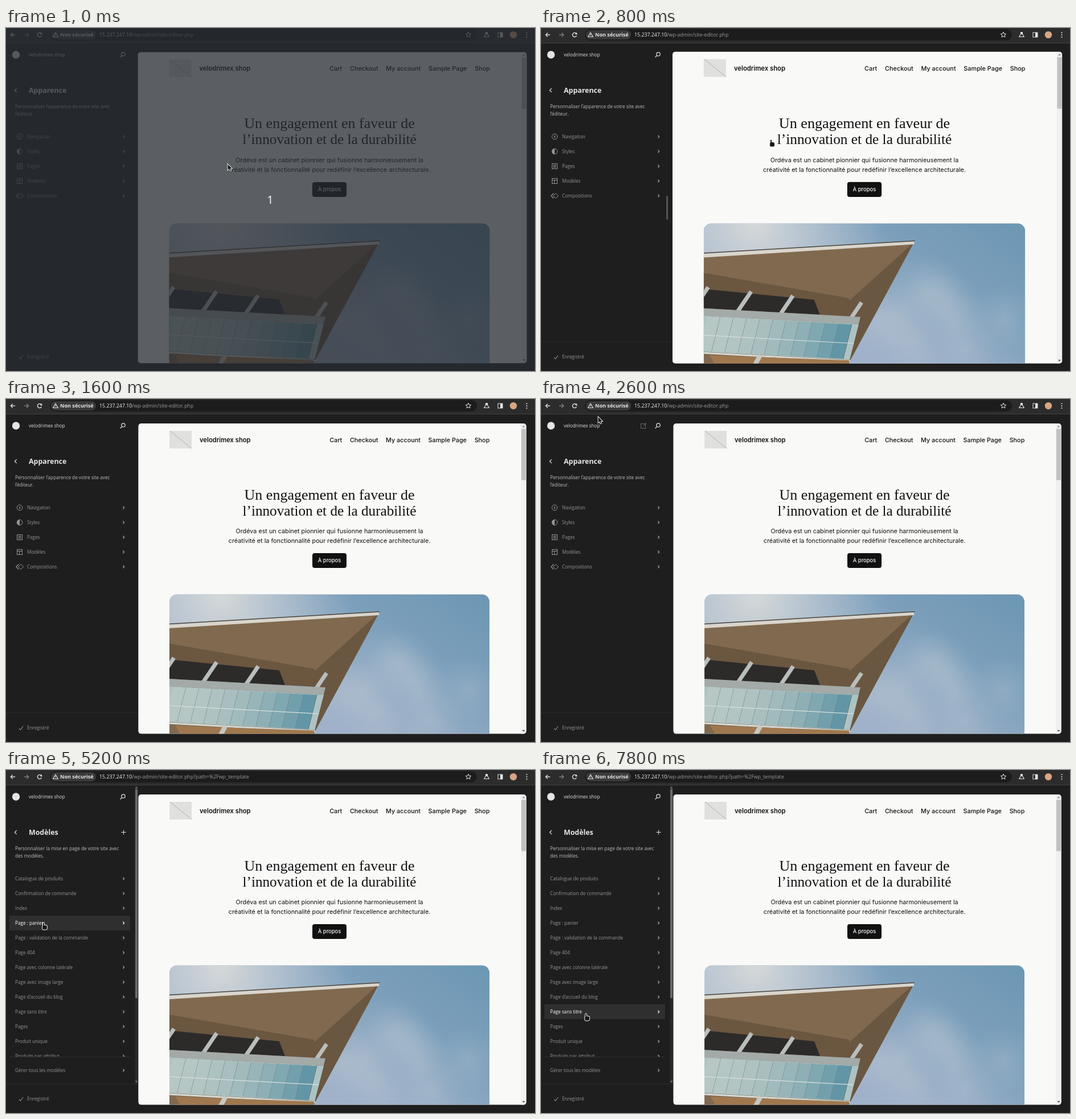
These frames come from a looping animation (929x603 px, 8 s). An HTML page with a canvas:

```html
<!DOCTYPE html>
<html lang="fr">
<head>
<meta charset="utf-8">
<title>Éditeur de site</title>
<style>
html, body { margin: 0; width: 100%; height: 100%; overflow: hidden; background: #1e1e1e; }
canvas { display: block; width: 929px; height: 603px; }
</style>
</head>
<body>
<canvas id="stage" width="929" height="603"></canvas>
<script>
const W = 929, H = 603, LOOP = 8000, TICK = 200, LIST_OPENS = 5000;
const ctx = document.getElementById('stage').getContext('2d');
const UI = '"Open Sans", "Noto Sans", sans-serif';
const SITE = 'Inter, sans-serif';
const SERIF = '"Liberation Serif", serif';
const SHOP = 'velodrimex shop';
const GREY = '#949494', LIGHT = '#e6e6e6', INK = '#111', PAPER = '#f9f9f7';

const menu = ['Navigation', 'Styles', 'Pages', 'Modèles', 'Compositions'];
const templates = ['Catalogue de produits', 'Confirmation de commande', 'Index', 'Page : panier',
  'Page : validation de la commande', 'Page 404', 'Page avec colonne latérale', 'Page avec image large',
  'Page d’accueil du blog', 'Page sans titre', 'Pages', 'Produit unique', 'Produits par attribut'];

// pointer waypoints: time, x, y
const route = [
  [0, 389, 239], [200, 389, 238], [800, 404, 196], [1200, -4, 277], [2000, -60, 200],
  [2400, 70, 6], [2600, 100, 31], [3200, 24, 314], [3600, 2, 290], [4000, 66, 268], [5800, 66, 268],
  [6200, 40, 290], [6600, 12, 98], [7000, 7, 215], [7200, 50, 567], [7600, 50, 567], [7800, 79, 428]
];

const mix = (a, b, k) => a + (b - a) * k;
const progress = (t, from, to) => Math.min(1, Math.max(0, (t - from) / (to - from)));
const ease = k => k * k * (3 - 2 * k);
const rowY = i => 191 + 26 * i;

function pointerAt(t) {
  const next = route.findIndex(key => key[0] > t);
  const [t1, x1, y1] = route[next < 0 ? route.length - 1 : next - 1];
  if (next < 0) return [x1, y1];
  const [t2, x2, y2] = route[next];
  const k = progress(t, t1, t2);
  return [mix(x1, x2, k), mix(y1, y2, k)];
}

// the preview swells while the pointer is over it
function pageScale(t) {
  const swell = ease(progress(t, 200, 800)) - ease(progress(t, 800, 1600)) + (1 - progress(t, 0, 200)) / 2;
  return 1 + 0.0045 * swell;
}

function seeded(seed) {
  return () => (seed = (seed * 16807) % 2147483647) / 2147483647;
}

function text(str, x, y, size, color, font = UI, weight = 400, align = 'left') {
  ctx.font = `${weight} ${size}px ${font}`;
  ctx.textAlign = align;
  ctx.fillStyle = color;
  ctx.fillText(str, x, y);
  return ctx.measureText(str).width;
}
function rect(x, y, w, h, color, radius = 0) {
  ctx.beginPath();
  ctx.roundRect(x, y, w, h, radius);
  ctx.fillStyle = color;
  ctx.fill();
}
function trace(points, closed) {
  ctx.beginPath();
  for (const [x, y] of points) ctx.lineTo(x, y);
  if (closed) ctx.closePath();
}
function fill(points, color) {
  trace(points, true);
  ctx.fillStyle = color;
  ctx.fill();
}
function stroke(points, color, width = 1, closed = false) {
  trace(points, closed);
  ctx.strokeStyle = color;
  ctx.lineWidth = width;
  ctx.stroke();
}
function line(x1, y1, x2, y2, color, width) {
  stroke([[x1, y1], [x2, y2]], color, width);
}
function disc(x, y, r, color, from = 0, to = 7) {
  ctx.beginPath();
  ctx.arc(x, y, r, from, to);
  ctx.fillStyle = color;
  ctx.fill();
}
function ring(x, y, r, color, width = 1, from = 0, to = 7) {
  ctx.beginPath();
  ctx.arc(x, y, r, from, to);
  ctx.strokeStyle = color;
  ctx.lineWidth = width;
  ctx.stroke();
}
function box(x, y, size, color) {
  ctx.strokeStyle = color;
  ctx.lineWidth = 1;
  ctx.strokeRect(x, y, size, size);
}
// points around a centre, first one straight up; inner alternates the radius
function around(x, y, r, n, inner = r) {
  return Array.from({ length: n }, (_, i) => {
    const a = i * 2 * Math.PI / n, d = i % 2 ? inner : r;
    return [x + d * Math.sin(a), y - d * Math.cos(a)];
  });
}
function chevron(x, y, color, dir = 1, size = 2.3) {
  const back = x - dir * size / 2;
  stroke([[back, y - size], [x + dir * size / 2, y], [back, y + size]], color, 1.2);
}
function scrollArrow(x, y, dir, color) {
  fill([[x - 2.5, y - dir * 1.5], [x + 2.5, y - dir * 1.5], [x, y + dir * 1.5]], color);
}

function drawToolbar(listOpen) {
  const y = 12;
  rect(0, 0, W, 26, '#2c2c2c');
  rect(0, 26, W, 1, '#414141');
  rect(77, 2, 750, 20, '#1c1c1c', 10);
  rect(79, 4, 79, 16, '#3a3a3a', 8);
  for (const [x, dir, color] of [[12, -1, LIGHT], [36, 1, '#858585']]) {
    line(x - 4, y, x + 4, y, color, 1.4);
    chevron(x + 2 * dir, y, color, dir, 3.5);
  }
  ring(59, y, 3.6, LIGHT, 1.4, 0.4, 5.5);
  fill(around(62, 10, 2.4, 3), LIGHT);
  stroke(around(87, 13, 5, 3), LIGHT, 1.1, true);
  line(87, 10.5, 87, 13.2, LIGHT);
  text('Non sécurisé', 95, 15.2, 9.1, LIGHT, UI, 700);
  const host = text('15.237.247.10', 164, 15.2, 8.8, '#f0f0f0');
  text('/wp-admin/site-editor.php' + (listOpen ? '?path=%2Fwp_template' : ''), 164 + host, 15.2, 8.8, '#9a9a9a');
  stroke(around(812, y, 5, 10, 2.3), LIGHT, 1, true);
  stroke(around(844, 13, 5, 3), LIGHT, 1.1, true);
  rect(842, 7, 4, 4, LIGHT);
  box(864, 8, 8, LIGHT);
  rect(868, 8, 4, 8, LIGHT);
  disc(891, y, 6.2, '#d9a583');
  for (const d of [-4, 0, 4]) disc(914.5, y + d, 1.1, LIGHT);
}

const menuIcons = [
  y => { ring(24, y, 4.8, GREY); fill(around(24, y, 3, 4, 1), GREY); },
  y => { ring(24, y, 4.8, GREY); disc(24, y, 4.8, GREY, Math.PI / 2, Math.PI * 1.5); },
  y => { box(19.5, y - 4.5, 9, GREY); for (const d of [-2, 0, 2]) line(21.5, y + d, 26.5, y + d, GREY); },
  y => { box(19.5, y - 4.5, 9, GREY); line(19.5, y - 1.5, 28.5, y - 1.5, GREY); line(23.5, y - 1.5, 23.5, y + 4.5, GREY); },
  y => { stroke(around(26, y, 4.5, 4), GREY, 1, true); chevron(20, y, GREY, -1, 4.5); }
];

function row(label, x, y, hovered) {
  if (hovered) rect(6, y - 13, 212, 26, '#2f2f2f', 1);
  text(label, x, y + 2.9, 8.2, hovered ? '#fff' : GREY);
  chevron(206.5, y, hovered ? '#fff' : '#aaa');
}

function drawHeading(title, ...description) {
  chevron(17, 109.5, LIGHT, -1, 3.3);
  text(title, 40, 114, 12.4, LIGHT, UI, 700);
  description.forEach((str, i) => text(str, 16, 140.7 + 13 * i, 8.2, '#bdbdbd'));
}

function drawMenu(hover) {
  drawHeading('Apparence', 'Personnaliser l’apparence de votre site avec', 'l’éditeur.');
  menu.forEach((label, i) => {
    row(label, 37, rowY(i), hover === i);
    menuIcons[i](rowY(i));
  });
}

function drawTemplates(hover) {
  drawHeading('Modèles', 'Personnaliser la mise en page de votre site avec', 'des modèles.');
  line(202.5, 109.5, 210.5, 109.5, LIGHT);
  line(206.5, 105.5, 206.5, 113.5, LIGHT);
  ctx.save();
  ctx.beginPath();
  ctx.rect(0, 160, 222, 344);
  ctx.clip();
  templates.forEach((label, i) => row(label, 16, rowY(i), hover === i));
  ctx.restore();
  rect(6, 504, 212, 1, '#2f2f2f');
  row('Gérer tous les modèles', 16, 528, false);
  rect(226.5, 28, 5, 523, '#292929');
  rect(227, 34, 4, 367, '#6a6a6a');
  scrollArrow(229, 31, -1, '#777');
  scrollArrow(229, 548, 1, '#777');
}

function drawSidebar(t, hover, onTitle) {
  disc(17.5, 47, 6.7, '#e4e4e4');
  text(SHOP, 40, 49.9, 8.2, '#dedede');
  ring(206, 46, 3.2, LIGHT, 1.2);
  line(203.7, 48.4, 200.6, 51.5, LIGHT, 1.3);
  if (onTitle) {
    box(175.5, 43.5, 8, '#666');
    line(179.5, 47.5, 185, 42, '#777');
  }
  if (t < LIST_OPENS) drawMenu(hover);
  else drawTemplates(hover);
  rect(0, 551, 231, 1, '#2c2c2c');
  stroke([[23, 579], [25.3, 581.6], [30, 575.5]], GREY, 1.1);
  text('Enregistré', 37, 581.4, 8.2, GREY);
  if (t >= 400 && t < 1200) rect(220, 295, 3, 42, '#555', 1.5);
}

function drawSky(left, top, w, h) {
  const random = seeded(11);
  const sky = ctx.createLinearGradient(left + w, top, left + w * 0.7, top + h);
  sky.addColorStop(0, '#6c97b3');
  sky.addColorStop(0.5, '#7c9fbb');
  sky.addColorStop(1, '#9fb2c9');
  ctx.fillStyle = sky;
  ctx.fillRect(left, top, w, h);
  const cloud = (x, y, r, alpha) => {
    const glow = ctx.createRadialGradient(x, y, 0, x, y, r);
    glow.addColorStop(0, `rgba(214, 217, 217, ${alpha})`);
    glow.addColorStop(1, 'rgba(190, 202, 212, 0)');
    ctx.fillStyle = glow;
    ctx.fillRect(left, top, w, h);
  };
  cloud(left + 90, top, 230, 1);
  for (let i = 0; i < 9; i++) cloud(left + w * mix(0.55, 1, random()), top + h * mix(0.45, 1, random()), 60, 0.2);
}

function drawBuilding() {
  const deck = (x, offset = 0) => [x, 492 + offset + (x - 287) * 0.055];
  const strip = (from, to, right, color) => fill([deck(287, from), deck(right, from), deck(right - (to - from) * 0.25, to), deck(287, to)], color);
  const tip = [655, 376], foot = [540, 589], corner = [287, 589];
  fill([[287, 399], tip, foot, corner], '#80694f');
  fill([tip, [540, 480], foot], '#6a5741');
  fill([[287, 430], [540, 474], [562, 508], [287, 492]], '#6b5640');
  fill([[287, 458], [480, 477], [490, 503], [287, 492]], '#2c2b29');
  line(287, 400, 655, 377, '#d9d5cc', 6);
  line(287, 395.5, 656, 374, '#4b443d', 1.5);
  for (const x of [295, 370, 443, 563]) line(x, 455 + (x - 295) * 0.1, x - 25, 492 + (x - 295) * 0.1, '#b9bebc', 7);
  strip(0, 13, 561, '#a3aaa8');
  strip(13, 76, 558, '#adc3c3');
  const paneWidth = 23;
  for (let i = 0; i < 11; i++) {
    const x = 293 + i * paneWidth;
    const pane = [deck(x, 14), deck(x + paneWidth, 14), deck(x + paneWidth - 15, 75), deck(x - 15, 75)];
    const blue = i / 10;
    fill(pane, `rgb(${mix(182, 98, blue * blue)}, ${mix(199, 150, blue * blue)}, ${mix(196, 166, blue * blue)})`);
    stroke(pane.slice(1, 3), '#66797b', 1);
  }
  stroke([deck(287, 47), deck(549, 47)], '#dce3e1', 1.2);
  stroke([deck(287, 78), deck(543, 78)], '#d8dcd9', 3);
  fill([[297, 574], [541, 583], foot, [306, 589]], '#a0784f');
  line(386, 574, 376, 592, '#c5c8c4', 8);
}

function drawPhoto() {
  ctx.save();
  ctx.beginPath();
  ctx.roundRect(287, 343.5, 562, 260, 13);
  ctx.clip();
  drawSky(287, 343, 562, 246);
  drawBuilding();
  ctx.restore();
}

function drawPage(scale) {
  const cx = 573, cy = 315.75;
  const centred = (str, y, size, font) => text(str, 568, y, size, INK, font, 400, 'center');
  ctx.save();
  ctx.translate(cx, cy);
  ctx.scale(scale, scale);
  ctx.translate(-cx, -cy);
  ctx.beginPath();
  ctx.roundRect(232.4, 43, 681.2, 545.6, 5);
  ctx.clip();
  rect(232, 42, 683, 548, PAPER);
  rect(287, 56, 39, 31, '#e0e0de');
  line(288, 56, 326, 87, '#a9a9a7', 0.9);
  text(SHOP, 340, 75.6, 11.2, INK, SITE, 600);
  let right = 849.3;
  for (const label of ['Shop', 'Sample Page', 'My account', 'Checkout', 'Cart'])
    right -= text(label, right, 75.6, 10.8, INK, SITE, 500, 'right') + 13.7;
  centred('Un engagement en faveur de', 176.5, 26, SERIF);
  centred('l’innovation et de la durabilité', 204.5, 25.2, SERIF);
  centred('Ordéva est un cabinet pionnier qui fusionne harmonieusement la', 236.3, 10.8, SITE);
  centred('créativité et la fonctionnalité pour redéfinir l’excellence architecturale.', 253.3, 10.8, SITE);
  rect(538, 271, 60, 26, INK, 4);
  text('À propos', 568, 287.3, 9.4, PAPER, SITE, 500, 'center');
  drawPhoto();
  rect(904, 43, 10, 546, '#f0f0f0');
  rect(905, 52.5, 8, 90, '#c1c1c1');
  scrollArrow(909, 48, -1, '#8a8a8a');
  scrollArrow(909, 583.5, 1, '#555');
  ctx.restore();
}

function drawPointer([x, y], hand) {
  const shape = new Path2D();
  if (hand) {
    shape.roundRect(x - 1, y + 0.5, 2, 9, 1);
    shape.roundRect(x - 2, y + 5, 8, 7.5, 2.5);
  } else {
    for (const [dx, dy] of [[0.5, 0.7], [0.5, 10.6], [2.8, 8.6], [4.4, 12.2], [6, 11.4], [4.5, 8], [7.6, 7.8]])
      shape.lineTo(x + dx, y + dy);
    shape.closePath();
  }
  ctx.strokeStyle = '#f4f4f4';
  ctx.lineWidth = 1.8;
  ctx.stroke(shape);
  ctx.fillStyle = '#1a1a1a';
  ctx.fill(shape);
}

function drawCountdown() {
  rect(0, 0, W, H, 'rgba(39, 43, 50, 0.75)');
  text('1', 464, 309, 20, '#fff', UI, 400, 'center');
}

function render(t) {
  const pos = pointerAt(t), [x, y] = pos;
  const listOpen = t >= LIST_OPENS, counting = t < TICK;
  const inRows = x >= 6 && x < 218 && y >= 178 && y < 178 + 26 * (listOpen ? 12 : menu.length);
  const hover = inRows ? Math.floor((y - 178) / 26) : -1;
  const onTitle = x > 0 && x < 218 && y > 27 && y < 67;
  rect(0, 0, W, H, '#1e1e1e');
  drawToolbar(listOpen);
  drawSidebar(t, hover, onTitle);
  drawPage(pageScale(t));
  if (counting) drawCountdown();
  drawPointer(pos, !counting && (inRows || x > 232));
}

function tick() {
  const t = performance.now() % LOOP;
  render(t - t % TICK);
  requestAnimationFrame(tick);
}
tick();
</script>
</body>
</html>
```
